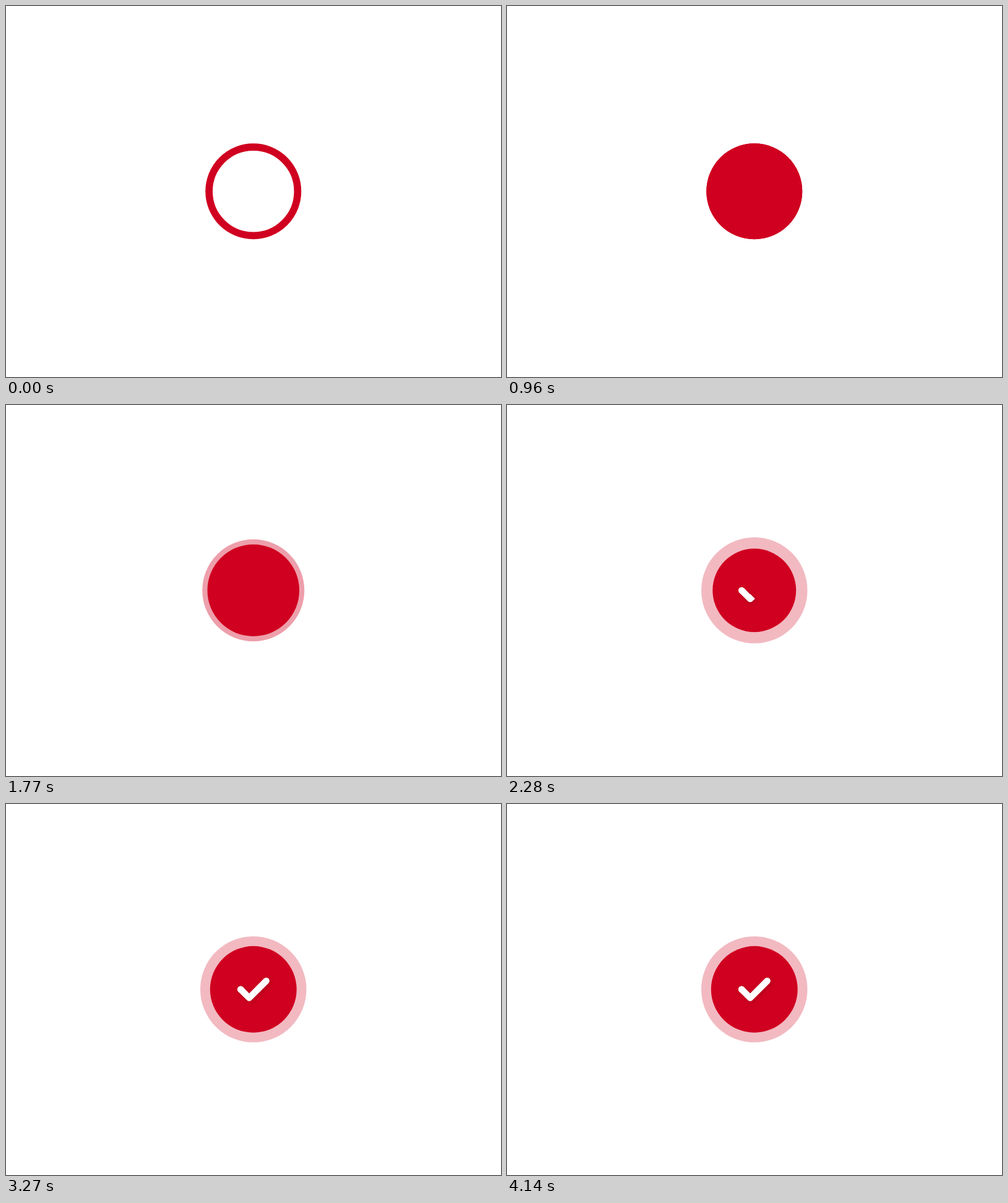
An HTML page with a canvas for the animation above (4170 ms loop, 800x600 px).

```html
<!DOCTYPE html>
<html>
<head>
<meta charset="utf-8">
<title>Success check</title>
<style>
  html, body { margin: 0; height: 100%; overflow: hidden; background: #fff; }
  canvas { display: block; }
</style>
</head>
<body>
<canvas width="800" height="600"></canvas>
<script>
const ctx = document.querySelector('canvas').getContext('2d');
const LOOP = 4170, STEP = 30, CENTER = 399.75, MIDDLE = 299.75;
const RED = '#d00020';

const smooth = u => u * u * (3 - 2 * u);
const easeOut = u => Math.sin(u * Math.PI / 2);
const linear = u => u;

// Keys are [time, value, easing towards this key].
function track(t, keys) {
  if (t <= keys[0][0]) return keys[0][1];
  for (let i = 1; i < keys.length; i++) {
    const [t0, v0] = keys[i - 1], [t1, v1, ease = smooth] = keys[i];
    if (t < t1) return v0 + (v1 - v0) * ease((t - t0) / (t1 - t0));
  }
  return keys[keys.length - 1][1];
}

const ringRadius = t => track(t, [[1020, 77.5], [1350, 93, easeOut], [1770, 82.5], [2070, 85.75]]);
const ringWidth = t => track(t, [[1020, 11.75], [1350, 14, easeOut], [1740, 14], [1890, 24]]);
const ringAlpha = t => track(t, [[1380, 1], [1890, 0.275]]);
const checkPart = t => track(t, [[2130, 0], [2460, 1]]);

function discRadius(t) {
  const landing = 1146, rest = 69.75;
  if (t < landing) {
    return track(t, [[510, 0], [780, 90.75], [960, 77.5], [1020, 77.5], [landing, rest, linear]]);
  }
  const d = t - landing;
  return rest - 8.1 * Math.exp(-d / 1080) * Math.sin(Math.PI * d / 420);
}

function circle(x, y, r) {
  ctx.beginPath();
  ctx.arc(x, y, r, 0, 2 * Math.PI);
}

function drawRing(t) {
  const width = ringWidth(t);
  ctx.globalAlpha = ringAlpha(t);
  ctx.strokeStyle = RED;
  ctx.lineWidth = width;
  circle(CENTER, MIDDLE, ringRadius(t) - width / 2);
  ctx.stroke();
  ctx.globalAlpha = 1;
}

function drawCheck(part) {
  if (part <= 0) return;
  const x = 379.2, y = 299.8, short = 13.8, long = 27.6;
  const run = part * (short + long);
  const down = Math.min(run, short), up = Math.max(run - short, 0);

  ctx.save();
  ctx.shadowColor = 'rgba(0,0,0,.15)';
  ctx.shadowBlur = 8;
  ctx.shadowOffsetX = ctx.shadowOffsetY = 2;
  ctx.strokeStyle = ctx.fillStyle = '#fff';
  ctx.lineWidth = 10.5;
  ctx.lineJoin = 'round';
  ctx.lineCap = part < 1 ? 'butt' : 'round';
  ctx.beginPath();
  ctx.moveTo(x, y);
  ctx.lineTo(x + down, y + down);
  if (up) ctx.lineTo(x + down + up, y + down - up);
  ctx.stroke();
  ctx.shadowColor = 'transparent';
  circle(x, y, 5.25);
  ctx.fill();
  ctx.restore();
}

function draw(now) {
  const t = Math.floor(now % LOOP / STEP) * STEP;
  ctx.fillStyle = '#fff';
  ctx.fillRect(0, 0, 800, 600);
  drawRing(t);
  ctx.fillStyle = RED;
  circle(CENTER, MIDDLE, discRadius(t));
  ctx.fill();
  drawCheck(checkPart(t));
}

const start = performance.now();
function tick() {
  draw(performance.now() - start);
  requestAnimationFrame(tick);
}
tick();
</script>
</body>
</html>
```
